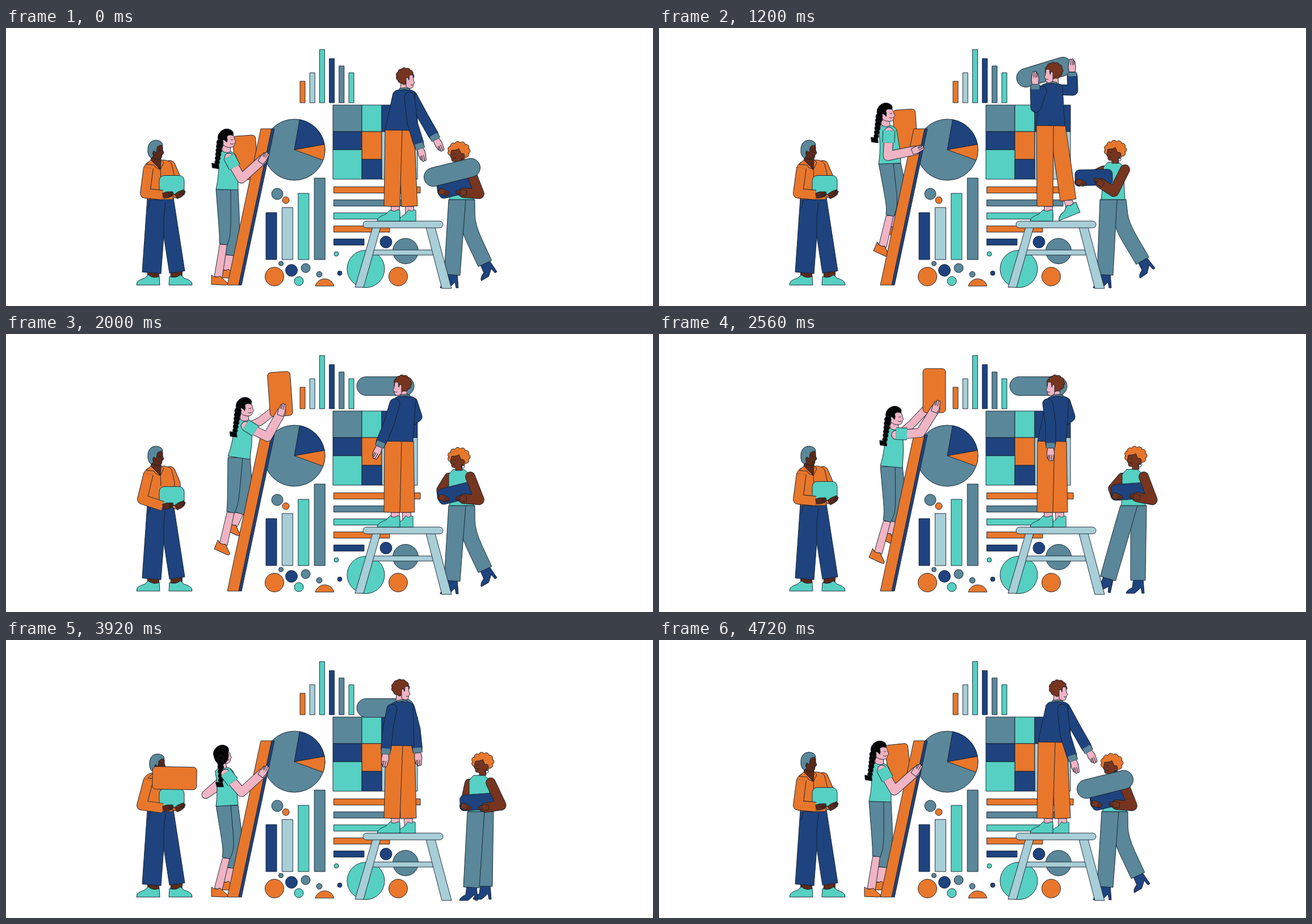
Write an HTML page with a canvas that moves like this. It is 1140 by 491 pixels and loops after 4.8 s.

```html
<!DOCTYPE html>
<html lang="en">
<head>
<meta charset="utf-8">
<title>Building with data</title>
<style>
html, body { margin: 0; width: 100%; height: 100%; overflow: hidden; background: #fff; }
canvas { display: block; width: 100vw; height: 100vh; }
</style>
</head>
<body>
<canvas id="stage"></canvas>
<script>
const W = 1140, H = 491, LOOP = 4800, STEP = 80;
const BEATS = [0, 1200, 2000, 2560, 3280, 3920, 4720];
const INK = '#14202e', ORANGE = '#e8772c', NAVY = '#1e437e', TEAL = '#56d0c2', SLATE = '#5a8799',
  PALE = '#a8ced8', PINK = '#f0b4c4', DARK = '#5b2a1a', BROWN = '#77351f', BLACK = '#050505';
const canvas = document.getElementById('stage'), ctx = canvas.getContext('2d');
let time = 0;

// ---- timing: go(i) eases 0 to 1 through beat i; during(i, j) rises in beat i and falls in beat j
const clamp = v => Math.max(0, Math.min(1, v));
const ramp = (a, b) => (1 - Math.cos(Math.PI * clamp((time - a) / (b - a)))) / 2;
const go = i => ramp(BEATS[i], BEATS[i + 1]);
const during = (i, j) => go(i) - go(j);

// ---- points
const add = (p, x, y) => [p[0] + x, p[1] + y];
const lerp = (a, b, k) => [a[0] + (b[0] - a[0]) * k, a[1] + (b[1] - a[1]) * k];
const shift = (p, ...moves) => moves.reduce((q, [w, x, y]) => add(q, w * x, w * y), p);
const blend = (weights, ...pts) => shift([0, 0], ...pts.map((p, i) => [weights[i], ...p]));
const angle = (a, b) => Math.atan2(b[1] - a[1], b[0] - a[0]);
const rad = d => d * Math.PI / 180;
const polar = (p, a, r) => add(p, Math.cos(a) * r, Math.sin(a) * r);
// elbow or knee between a and b for two bone lengths
function joint(a, b, l1, l2, side, most = 99) {
  const d = Math.hypot(b[0] - a[0], b[1] - a[1]), t = angle(a, b);
  const x = d > l1 + l2 ? d * l1 / (l1 + l2) : (d * d + l1 * l1 - l2 * l2) / (2 * d);
  const h = d > l1 + l2 ? 0 : Math.min(most, Math.sqrt(Math.max(0, l1 * l1 - x * x)));
  return polar(polar(a, t, x), t + Math.PI / 2, h * side);
}

// ---- drawing
function ink(path, col) {
  if (col) { ctx.fillStyle = col; ctx.fill(path); }
  ctx.strokeStyle = INK; ctx.lineWidth = .9; ctx.stroke(path);
}
function place(p, rot, sx, sy, draw) {
  ctx.save(); ctx.translate(p[0], p[1]); ctx.rotate(rot); ctx.scale(sx, sy); draw(); ctx.restore();
}
const shape = (col, d, p, rot = 0, sx = 1, sy = 1) => place(p, rot, sx, sy, () => ink(new Path2D(d), col));
const poly = (col, ...pts) => ink(new Path2D('M' + pts.join('L') + 'Z'), col);
const line = (...pts) => ink(new Path2D('M' + pts.join('L')));
const box = (col, x, y, x2, y2) => poly(col, [x, y], [x2, y], [x2, y2], [x, y2]);
function disc(col, x, y, r, from = 0, to = 2 * Math.PI) {
  const p = new Path2D();
  p.arc(x, y, r, from, to);
  p.closePath();
  ink(p, col);
}
function oval(col, x, y, rx, ry) {
  ctx.fillStyle = col;
  ctx.beginPath();
  ctx.ellipse(x, y, rx, ry, 0, 0, 7);
  ctx.fill();
}
function block(col, p, w, h, r, rot = 0, s = 1) {
  if (s <= .01) return;
  place(p, rad(rot), s, s, () => {
    const b = new Path2D();
    b.roundRect(-w / 2, -h / 2, w, h, r);
    ink(b, col);
  });
}
function limb(col, w, pts, cap = 'round') {
  const p = new Path2D('M' + pts.join('L'));
  ctx.lineJoin = 'round'; ctx.lineCap = cap;
  ctx.strokeStyle = INK; ctx.lineWidth = w + .9; ctx.stroke(p);
  ctx.strokeStyle = col; ctx.lineWidth = w - .9; ctx.stroke(p);
  ctx.lineCap = 'butt';
}
// tapered leg with a rounded knee
function leg(col, a, k, b, w1, w2) {
  const edge = s => {
    const top = add(a, -s * w1 / 2, 0);
    const knee = polar(k, angle(a, b) + Math.PI / 2, s * (w1 + w2) / 4);
    const end = polar(b, angle(k, b) + Math.PI / 2, s * w2 / 2);
    return [top, lerp(top, knee, .6), knee, lerp(knee, end, .4), end];
  };
  const l = edge(1), r = edge(-1);
  ink(new Path2D(`M${l[0]}L${l[1]}Q${l[2]} ${l[3]}L${l[4]}L${r[4]}L${r[3]}Q${r[2]} ${r[1]}L${r[0]}Z`), col);
}
const shin = (col, a, b, w1, w2) => leg(col, a, lerp(a, b, .5), b, w1, w2);
function hand(col, p, rot, flip = 1, s = 1) {
  shape(col, 'M-6 -5L2 -6L13 -4Q16 -3 14 -1L15 1Q15 3 12 3L11 5L3 6L-6 5Z', p, rot, s, s * flip);
  shape(null, 'M5 -2L14 -1M5 1L13 2M5 3L11 4', p, rot, s, s * flip);
}
function curls(col, p, rx, ry) {
  const n = 11, r = 5;
  for (let i = 0; i < n; i++) {
    const a = i / n * 2 * Math.PI;
    disc(col, p[0] + Math.cos(a) * (rx - r), p[1] + Math.sin(a) * (ry - r), r);
  }
  oval(col, ...p, rx - 3, ry - 3);
}

// ---- scenery
function charts() {
  [[38, ORANGE], [53, PALE], [94, TEAL], [78, NAVY], [65, SLATE], [53, TEAL]].forEach(([h, c], i) =>
    box(c, 518 + i * 17.2, 132 - h, 527 + i * 17.2, 132));
  disc(SLATE, 508, 215, 54);
  [[NAVY, -80, -10], [ORANGE, -10, 20]].forEach(([c, a, b]) => {
    const p = new Path2D('M508 215');
    p.arc(508, 215, 54, rad(a), rad(b));
    p.closePath();
    ink(p, c);
  });
  box(SLATE, 576, 136, 627, 183); box(TEAL, 627, 136, 662, 183); box(NAVY, 662, 136, 725, 183);
  box(NAVY, 576, 183, 627, 215); box(ORANGE, 627, 183, 662, 232); box(PALE, 662, 183, 725, 267);
  box(TEAL, 576, 215, 627, 267); box(NAVY, 627, 232, 662, 267);
  [ORANGE, SLATE, TEAL, ORANGE, NAVY].forEach((c, i) => {
    const y = 280.5 + i * 23;
    box(c, 577.5, y, i < 4 ? 730 - i * 18 : 631, y + 11);
  });
  [[326, NAVY], [317, PALE], [292, TEAL], [265, SLATE]].forEach(([y, c], i) =>
    box(c, 458 + i * 28.4, y, 477 + i * 28.4, 409));
  [[SLATE, 478, 293, 10], [ORANGE, 493, 304, 6], [ORANGE, 473, 439, 16.5], [SLATE, 484.5, 416, 4],
   [NAVY, 503, 428, 10.5], [SLATE, 528, 424, 8], [TEAL, 516, 447, 8], [SLATE, 552, 435, 5],
   [NAVY, 588, 433, 4], [TEAL, 582, 399, 4], [TEAL, 634, 425.5, 33], [NAVY, 669.5, 378, 10.5],
   [SLATE, 704, 394, 22.5], [ORANGE, 691, 439, 16.5]].forEach(c => disc(...c));
  disc(ORANGE, 561.5, 460, 17, Math.PI + .25, 2 * Math.PI - .25);
}
function stool() {
  box(PALE, 645, 392, 757, 401);
  poly(PALE, [646, 352], [660, 352], [630, 458], [615, 458]);
  poly(PALE, [740, 352], [756, 352], [785, 460], [768, 460]);
  block(PALE, [699.5, 347], 141, 12, 6);
}
function ladder() {
  poly(NAVY, [468, 178], [473, 178], [415, 454], [410, 454]);
  poly(ORANGE, [449, 178], [468, 178], [410, 454], [390, 454]);
}

// ---- orange cards: one is lifted, placed and shrinks away, the next drops in and is passed on
const placedCard = () => shift([422, 229], [go(0), 12, -46], [go(1), 49, -77], [go(2), 2, -6], [go(3), 0, 20]);
const newCard = () => shift([297, 174], [go(4), 0, 70], [go(5), 125, -21]);
function cards() {
  block(ORANGE, placedCard(), 40, 78, 6, -4 * (1 - go(2)), 1 - .36 * go(3) - .64 * go(4));
  block(ORANGE, newCard(), 40, 78, 6, 91 - 97 * go(5), go(3));
}

// ---- slate pills, same cycle
function pills() {
  const p = shift([786, 255], [go(0), -107, -177], [go(1), -10.5, 14], [go(4), 0, 28]);
  block(SLATE, p, 101, 33, 16.5, -14 - 3 * go(0) + 17 * go(1), 1 - ramp(4000, 4400));
  const fall = clamp((time - 4160) / 320) ** 2;
  block(SLATE, [786, 105 + 150 * fall], 101, 33, 16.5, -14 * fall, ramp(4000, 4240));
}

// ---- man with the teal box
function carrier() {
  const dip = during(1, 2), look = during(3, 4), caught = during(4, 5);
  const head = add([263, 217], 3 * caught - 6 * look, 3 * caught);
  const load = shift([292, 277], [dip, 0, 9], [look, 9, -10], [caught, 0, 2]);
  const elbow = [245 - 5 * dip + 5 * look - 6 * caught, 292];
  const step = 11 * look;
  const shoe = 'M-21 13L-20 8Q-16 3 -7 1Q-2 -4 0 -5Q8 2 19 -2L20 13Z';
  shin(DARK, [259, 428], [260, 441], 20, 20);
  shin(DARK, [301 + step, 426], [300 + step, 440], 20, 20);
  shape(TEAL, shoe, [251, 441]);
  shape(TEAL, shoe, [307 + step, 441 - step / 4], rad(-step), -1);
  poly(NAVY, [249, 301], [240, 431], [273, 434], [278, 368], [288 + step, 433 - step / 4],
    [315 + step * .8, 429 - step / 2], [295, 300]);
  line([281, 307], [278, 335], [278, 368]);
  line([254, 304], [251, 318]);
  limb(ORANGE, 18, [[289, 243], [298, 264], add(load, 8, 14)]);
  shape(ORANGE, 'M243 246Q246 237 256 235L278 233Q290 234 292 241L297 262L294 303L249 303Z', [0, 0]);
  shape(DARK, 'M-8 4L-7 20L9 33L10 10Z', head);
  shape(ORANGE, 'M-8 16L-16 24L-2 25L0 29L9 33Z', head);
  shape(ORANGE, 'M10 15L15 21L9 33Z', head);
  shape(DARK, 'M-8 -6L11 -13Q14 -7 13 -2L15 4L12 7Q12 16 4 15Q-9 14 -9 4Z', head);
  shape(SLATE, 'M-13 3Q-15 -18 1 -19Q13 -18 13 -10Q4 -10 3 -5L2 3L-3 0Q-6 5 -3 9L-7 13Q-12 10 -13 3Z', head);
  shape(null, 'M6 8Q8 11 11 8M6 -1Q8 0 10 -1', head);
  line([272, 250], [273, 268]);
  block(TEAL, load, 44, 33, 9);
  const grip = add(load, -10, 18);
  limb(ORANGE, 17, [[251, 247], elbow, add(grip, -6, 0)], 'butt');
  hand(DARK, grip, rad(-12), 1, .9);
  hand(DARK, add(load, 12, 18), rad(-32), 1, .9);
}

// ---- woman on the ladder
function climber() {
  const climb = during(0, 4), reach = during(1, 3), settle = during(2, 3), peek = during(3, 4), back = during(4, 5);
  const hip = shift([389, 285], [climb, 17, -46], [reach, 4, -21], [settle, -1, 16], [peek, 4, 28], [back, 0, 7]);
  const ankleA = shift([374, 440], [climb, 20, -54], [reach, -11, -14], [settle, 3, 15], [peek, -2, 8]);
  const ankleB = shift(ankleA, [1, 15, -12], [climb, 3, -22], [peek, -9, 26]);
  const lean = rad(-4 * climb + 11 * reach - 3 * settle + 19 * peek - 5 * back);
  const up = r => polar(hip, lean - Math.PI / 2, r);
  const head = up(88), neck = up(68), shoulder = add(neck, 4, 12);
  const card = go(3) < 1 ? placedCard() : newCard();
  const rung = [452, 130 + .36 * hip[1]];
  const palm = lerp(rung, add(card, 2, 32), reach);
  const palm2 = lerp(lerp(rung, [376, 257], back), add(card, -12, 30), 1 - during(3, 5));
  const elbow = joint(shoulder, palm, 43, 50, 1);
  const elbow2 = lerp(add(lerp(neck, palm2, .55), 0, 12), [352, 273], back);
  const tilt = rad(22 * climb - 14 * peek);
  const foot = 'M-12 -4Q-5 3 3 -2L16 10Q18 14 12 14L-12 13Z';

  limb(PINK, 14, [add(neck, 10, 12), elbow2, palm2]);
  cards();
  const legs = [[add(hip, 5, 0), ankleB, .62, 30, 21], [add(hip, -6, 0), ankleA, .25, 26, 14]];
  legs.forEach(([top, ankle, cut, w1, w2]) => {
    const half = w1 < 30 ? 78 : 72;
    const knee = joint(top, ankle, half, half, -1, 14), cuff = lerp(knee, ankle, cut);
    shin(PINK, cuff, ankle, w2 - 1, 14);
    shape(ORANGE, foot, ankle, tilt);
    leg(SLATE, top, knee, cuff, w1, w2);
  });
  shape(TEAL, 'M-19 0Q-12 -30 -15 -62L-6 -69L6 -67Q16 -64 17 -56Q21 -28 20 1Z', hip, lean);
  shape(PINK, 'M-8 6L-8 20Q0 26 7 21L6 10Z', head);
  shape(PINK, 'M-8 -8L10 -9Q14 -4 14 0L16 4L14 6Q14 14 6 14Q-8 14 -8 2Z', head, lean / 2);
  shape(null, 'M6 7Q9 10 12 7M7 0Q9 1 11 0', head, lean / 2);
  shape(BLACK, 'M-10 10Q-21 -4 -11 -14Q-2 -22 7 -17Q13 -14 11 -7Q3 -10 0 -5Q2 1 0 5Q-6 -3 -8 3Q-8 8 -6 12Z',
    head, lean / 2);
  oval(BLACK, head[0] - 2, head[1] - 1, 13 * back, 17 * back);
  const root = add(head, -12 + 9 * back, 5);
  const tail = shift(root, [1, -6, 42], [peek, -26, -18], [back, 6, 4]);
  for (let i = 0; i < 6; i++) disc(BLACK, ...lerp(root, tail, i / 6), 5.8 - i * .3);
  shape(BLACK, 'M-9 -4L3 -4L5 4L-7 4Z', tail, angle(root, tail) - Math.PI / 2);
  ladder();
  limb(PINK, 16, [shoulder, elbow, palm]);
  limb(TEAL, 21, [add(shoulder, 0, -2), lerp(shoulder, elbow, .45)], 'butt');
  hand(PINK, palm, angle(elbow, palm) - .2, -1, 1.05);
}

// ---- woman with the navy box
function helper() {
  const free = during(0, 1), walk = during(2, 5), follow = during(3, 5);
  const hip = [803 - 3 * free + 33 * walk, 303];
  const neck = [797 + 3 * free + 36 * walk, 239 - 2 * free];
  const head = shift(neck, [1, 1, -20], [free, 3, 0], [walk, 6, -2]);
  const load = shift([794, 281], [free, -28, -17], [walk, 36, -3], [follow, 3, 8]);
  const cuffL = shift([786, 436], [walk, 5, -4], [follow, 29, 5]);
  const cuffR = shift([844, 416], [free, 8, -5], [walk, 0, 19]);
  const boot = 'M-8 -4L9 -4L11 23L7 23L5 13Q-2 20 -6 23L-21 23Q-20 17 -10 13Z';
  shape(NAVY, boot, cuffR, rad(30 * walk - 30 - 4 * free));
  shape(NAVY, boot, cuffL, rad(16 * (walk - follow)));
  const topR = add(hip, 9, 0), topL = add(hip, -8, 0);
  leg(SLATE, topR, add(lerp(topR, cuffR, .42), 12 * walk - 12, 0), cuffR, 28, 26);
  leg(SLATE, topL, lerp(topL, cuffL, .5), cuffL, 30, 28);
  const gripL = add(load, -26, 8), gripR = add(load, 12, 10);
  const shL = add(neck, -17, 14), shR = add(neck, 21, 13);
  limb(BROWN, 15, [shL, joint(shL, gripL, 26, 14, 1), gripL]);
  poly(TEAL, add(neck, -9, 0), add(neck, 10, 0), add(neck, 20, 9), add(neck, 19, 30),
    add(hip, 21, 0), add(hip, -21, 0), add(neck, -17, 30), add(neck, -17, 9));
  curls(ORANGE, add(head, 0, -2), 20, 17);
  shape(BROWN, 'M-13 -3Q-4 -3 0 -6L4 3Q10 1 10 7Q9 13 5 12L6 22L-6 22L-6 17Q-14 18 -13 11L-15 7Z', head);
  shape(null, 'M-11 10Q-9 13 -6 10M-10 3Q-8 4 -6 3', head);
  disc(null, head[0] + 7, head[1] + 15, 3);
  block(NAVY, load, 66, 28, 8, -14 + 13 * free + 10 * walk);
  const elbow = joint(shR, gripR, 44, 28, -1);
  limb(BROWN, 17, [shR, elbow, gripR]);
  hand(BROWN, gripR, angle(elbow, gripR), -1, .9);
  hand(BROWN, gripL, rad(20), 1, .9);
}

// ---- man on the stool: weights of reaching down, lifting, resting and turning round
function builder() {
  const lift = during(0, 1), turn = during(4, 5), swing = during(2, 3);
  const reach = 1 - during(0, 5);
  const pose = (...pts) => blend([reach, lift, during(1, 4), turn], ...pts);
  const head = pose([703, 87], [696, 77], [699, 89], [695, 86]);
  const neck = pose([702, 108], [692, 97], [703, 109], [698, 108]);
  const waist = pose([693, 180], [690, 172], [692, 189], [694, 186]);
  const elbowL = add(pose([716, 168], [664, 140], [674, 160], [673, 155]), 16 * swing, 0);
  const handL = add(pose([729, 210], [663, 103], [659, 196], [669, 198]), 31 * swing, 2 * swing);
  const elbowR = pose([735, 157], [729, 110], [724, 146], [721, 158]);
  const handR = pose([756, 194], [728, 81], [704, 161], [725, 196]);
  const cuffL = [680, 315], cuffR = shift([706, 315], [reach, 5, 0], [lift, 15, -11], [turn, 3, 0]);
  const shoeR = shift([706, 341], [reach, 5, 0], [lift, 22, -10], [turn, 4, 0]);
  const face = 1 - 2 * go(0) + 1.2 * go(3) + .8 * go(4);
  const shoe = 'M-25 0Q-24 -8 -10 -12Q-4 -18 -2 -20Q5 -15 11 -20L15 -19L15 0Z';
  const arm = (s, e, w) => {
    const a = angle(e, w);
    limb(NAVY, 18, [s, e, lerp(e, w, .85)]);
    hand(PINK, polar(w, a, 10), a, 1, 1.1);
    limb(SLATE, 16, [lerp(e, w, .85), lerp(e, w, 1.08)], 'butt');
  };
  shin(PINK, add(cuffL, 6, 0), [686, 328], 15, 14);
  shin(PINK, cuffR, lerp(cuffR, shoeR, .6), 15, 14);
  shape(TEAL, shoe, shoeR, rad(-22 * lift), .75 + .25 * lift);
  shape(TEAL, shoe, [679, 341]);
  const topR = add(waist, 12, 0), topL = add(waist, -10, 0);
  leg(ORANGE, topR, lerp(topR, cuffR, .5), cuffR, 28, 28);
  leg(ORANGE, topL, lerp(topL, cuffL, .5), cuffL, 30, 28);
  arm(add(neck, 13, 12), elbowR, handR);
  shape(PINK, 'M-7 8L7 10L8 22L-8 22Z', head);
  const wl = add(waist, -25, 0), wr = add(waist, 25, 1);
  ink(new Path2D(`M${wl}L${add(neck, -20, 7)}Q${add(neck, -16, 1)} ${add(neck, -9, 1)}L${add(neck, 9, 1)}Q${add(neck, 17, 2)} ${add(neck, 19, 7)}L${wr}Z`), NAVY);
  shape(SLATE, 'M-9 -1Q0 -4 9 -1L9 2Q0 -1 -9 2Z', neck);
  curls(BROWN, add(head, 0, -2), 16, 15);
  shape(PINK, 'M2 5Q1 1 5 0L7 5L8 -4L14 -4L15 5L17 10L15 12Q15 20 8 20L2 17Z', head, 0, face);
  shape(null, 'M10 13Q12 15 14 13', head, 0, face);
  arm(add(neck, -18 + 27 * reach, 14), elbowL, handL);
}

function draw(now) {
  time = Math.floor(now % LOOP / STEP) * STEP;
  const dpr = window.devicePixelRatio || 1;
  const w = Math.round(innerWidth * dpr), h = Math.round(innerHeight * dpr);
  if (canvas.width !== w || canvas.height !== h) { canvas.width = w; canvas.height = h; }
  ctx.setTransform(w / W, 0, 0, h / H, 0, 0);
  ctx.fillStyle = '#fff';
  ctx.fillRect(0, 0, W, H);
  charts();
  helper();
  pills();
  stool();
  builder();
  carrier();
  climber();
}
const start = performance.now();
function tick() {
  draw(performance.now() - start);
  requestAnimationFrame(tick);
}
tick();
</script>
</body>
</html>
```
